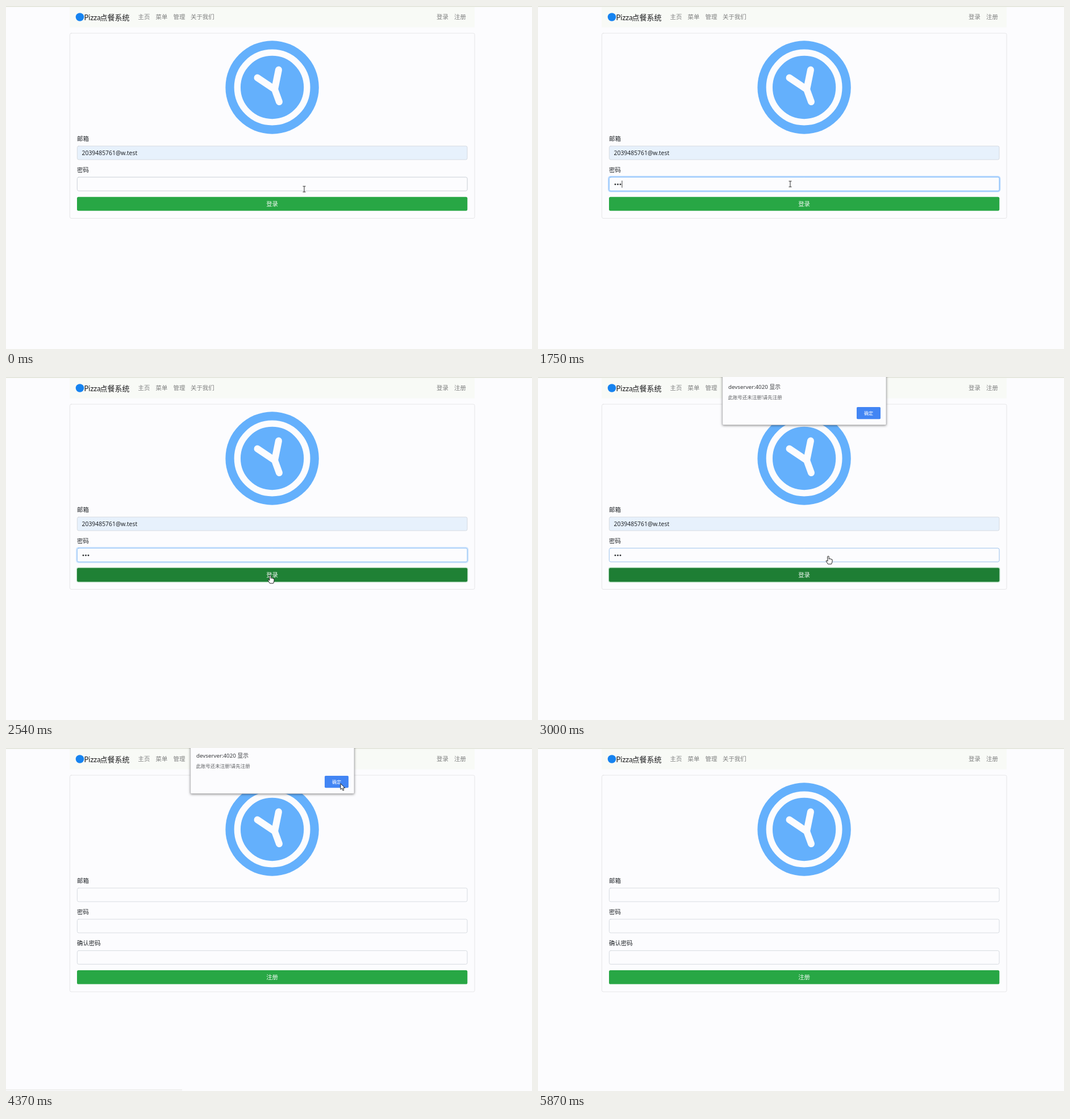
These frames come from a looping animation (926 by 605 pixels, 6580 ms). An HTML page with a canvas:

```html
<!DOCTYPE html>
<html lang="zh-CN">
<head>
<meta charset="utf-8">
<title>登录</title>
<style>
html, body { margin: 0; width: 100%; height: 100%; overflow: hidden; background: #fcfcfe; }
canvas { display: block; width: 926px; height: 605px; }
</style>
</head>
<body>
<canvas id="stage" width="926" height="605"></canvas>
<script>
const ctx = document.getElementById('stage').getContext('2d');
const LOOP = 6580;
const PAPER = '#fcfcfe', INK = '#212529', BLUE = '#64b0fc';
const SANS = '"Noto Sans", "Noto Sans CJK SC", sans-serif';

// Moments of the story, in ms
const FOCUS = 900, HOVER = 2020, PRESS = 2430, OPEN = 2540;
const DIALOG_HOVER = 3540, CLOSE = 4330, LINE_END = 4900, LEAVE = 5860;
const KEYS = [1390, 1550, 1710];

// Pointer hotspot: time, x, y
const PATH = [
  [0, 525, 323], [40, 525, 323], [660, 462, 316], [1000, 444, 314],
  [1800, 444, 314], [2020, 465, 347], [2370, 465, 350], [2700, 465, 350],
  [2840, 480, 376], [3000, 511, 316], [3350, 518, 106], [3620, 587, 62],
  [3790, 589, 63], [4450, 589, 63], [4660, 592, 88], [5000, 593, 94],
  [5400, 559, 84], [LEAVE, 344, -14]
];

const clamp = v => Math.max(0, Math.min(1, v));
const progress = (t, start, length) => clamp((t - start) / length);
const ease = v => v * v * (3 - 2 * v);
const mix = (a, b, p) =>
  `rgb(${a.map((v, i) => Math.round(v + (b[i] - v) * p)).join()})`;

function text(s, x, middle, size, color = INK, align = 'left', family = SANS) {
  ctx.font = `${size}px ${family}`;
  ctx.fillStyle = color;
  ctx.textAlign = align;
  ctx.fillText(s, x, middle + size * 0.37);
}

function box(x, y, w, h, r, fill, stroke, width = 0.8) {
  ctx.beginPath();
  ctx.roundRect(x, y, w, h, r);
  if (fill) { ctx.fillStyle = fill; ctx.fill(); }
  if (stroke) { ctx.strokeStyle = stroke; ctx.lineWidth = width; ctx.stroke(); }
}

function disc(x, y, r, color) {
  ctx.fillStyle = color;
  ctx.beginPath();
  ctx.arc(x, y, r, 0, 7);
  ctx.fill();
}

function polyline(points, color, width) {
  ctx.strokeStyle = color;
  ctx.lineWidth = width;
  ctx.lineCap = ctx.lineJoin = 'round';
  ctx.beginPath();
  points.forEach(([x, y]) => ctx.lineTo(x, y));
  ctx.stroke();
}

function header() {
  ctx.fillStyle = '#dfe1d5';
  ctx.fillRect(0, 0, 926, 1.5);
  ctx.fillStyle = '#f8faf6';
  ctx.fillRect(112, 2, 713, 35.5);
  disc(130, 19.5, 7.3, '#1683f0');
  text('Pizza', 137.5, 20, 13, '#1c1c1e', 'left', 'Lato, sans-serif');
  text('点餐系统', 165.5, 20, 13, '#1c1c1e');
  const links = [['主页', 232.5], ['菜单', 263.5], ['管理', 294.5],
    ['关于我们', 325], ['登录', 758], ['注册', 789]];
  links.forEach(([label, x]) => text(label, x, 19.5, 10.4, '#7e7f7f'));
}

function clock() {
  disc(468.6, 143.5, 82.2, BLUE);
  ctx.strokeStyle = PAPER;
  ctx.lineWidth = 11.3;
  ctx.beginPath();
  ctx.arc(468.6, 143.5, 61.3, 0, 7);
  ctx.stroke();
  polyline([[442.5, 126.5], [473, 147], [481, 169]], PAPER, 12);
  polyline([[480, 112.5], [473, 147]], PAPER, 12);
}

function field(label, y, fill = PAPER, border = '#ced4da') {
  text(label, 125, y - 13, 10.4);
  box(125.4, y, 686.6, 24, 2.6, fill, border);
}

function button(label, y, color) {
  box(125, y, 687.3, 24.5, 2.6, color);
  text(label, 468.6, y + 12.5, 10.4, '#f4fbf5', 'center');
}

function passwordState(t) {
  const lost = progress(t, PRESS, 300);
  const glow = progress(t, FOCUS, 150) * (1 - lost);
  if (glow > 0) box(124.3, 300.9, 688.8, 26.2, 3.6, null, `rgba(0,123,255,${0.28 * glow})`, 2.4);
  const on = progress(t, FOCUS, 150) - 0.35 * lost;
  box(125.4, 302, 686.6, 24, 2.6, PAPER, mix([206, 212, 218], [128, 189, 255], on), 0.9);

  const typed = KEYS.filter(k => t >= k).length;
  for (let i = 0; i < typed; i++) disc(136 + i * 4.5, 314.6, 1.45, '#2b2d30');
  const since = t - Math.max(FOCUS, ...KEYS.filter(k => t >= k));
  if (t >= FOCUS && t < PRESS && since % 1000 < 500) {
    ctx.fillStyle = '#333';
    ctx.fillRect(134 + typed * 4.5, 308, 0.9, 12.5);
  }
}

function loginPage(t) {
  box(112.4, 48, 712.7, 326.5, 2.6, null, '#e0e0e2');
  clock();
  field('邮箱', 247, '#e7f1fc');
  text('2039485761@w.test', 133.5, 259, 10.4);
  field('密码', 302);
  passwordState(t);
  const pressed = progress(t, PRESS, 150);
  if (pressed) box(124.4, 336.1, 688.5, 25.7, 3, null, `rgba(40,167,69,${0.3 * pressed})`, 1.4);
  const color = pressed
    ? mix([33, 136, 56], [30, 126, 52], pressed)
    : mix([40, 167, 69], [33, 136, 56], progress(t, HOVER, 150));
  button('登录', 336.7, color);
}

function registerPage() {
  box(112.4, 48, 712.7, 382, 2.6, null, '#e0e0e2');
  clock();
  field('邮箱', 247);
  field('密码', 302);
  field('确认密码', 357.4);
  button('注册', 392, '#28a745');
}

function dialog(t) {
  const shown = ease(progress(t, OPEN, 110));
  const gone = progress(t, CLOSE, 160);
  if (shown === 0 || gone === 1) return;
  ctx.save();
  ctx.globalAlpha = shown * (1 - clamp(gone * 1.6 - 0.6));
  ctx.translate(0, -16 * (1 - shown) - 16 * gone);
  ctx.save();
  ctx.shadowColor = 'rgba(0,0,0,.5)';
  ctx.shadowBlur = 4;
  ctx.shadowOffsetY = 1;
  box(324.7, -10, 288.3, 94.5, 1.5, PAPER);
  ctx.restore();
  box(324.7, -10, 288.3, 94.5, 1.5, null, '#b5b5b8', 0.7);
  text('devserver:4020 显示', 335, 17, 9.75, '#37393c');
  text('此账号还未注册!请先注册', 334.5, 36, 8.45, '#5c5e61');
  const hovered = t >= DIALOG_HOVER && t < CLOSE;
  box(561, 53, 42, 21.3, 1.8, hovered ? '#4080e5' : '#4285f4');
  text('确定', 582, 64, 8, '#fff', 'center');
  ctx.restore();
}

function pointerAt(t) {
  const i = PATH.findIndex(p => p[0] > t);
  const [t0, x0, y0] = PATH[i - 1], [t1, x1, y1] = PATH[i];
  const p = ease((t - t0) / (t1 - t0));
  return [x0 + (x1 - x0) * p, y0 + (y1 - y0) * p];
}

function beam() {
  ctx.fillStyle = '#333';
  ctx.fillRect(-0.5, -5, 1, 10);
  ctx.fillRect(-2.5, -5.5, 5, 1);
  ctx.fillRect(-2.5, 4.5, 5, 1);
}

function shape(d) {
  const path = new Path2D(d);
  ctx.fillStyle = '#fff';
  ctx.fill(path);
  ctx.strokeStyle = '#222';
  ctx.lineWidth = 1;
  ctx.lineJoin = 'round';
  ctx.stroke(path);
}

const hand = () => shape('M-1.2 0.5Q0-.8 1.2.5V5L3 4.6 4.8 5.2 7 6V10L5.5 14H-.5L-4 8.5Q-3.5 6.8-1.2 8.5Z');
const arrow = () => shape('M0 0V10.2L2.4 8 4.1 12 5.9 11.2 4.2 7.4H7.4Z');

function pointer(t) {
  if (t >= LEAVE) return;
  const [x, y] = pointerAt(t);
  ctx.save();
  ctx.translate(x, y);
  if (t < 1900) beam();
  else if (t < 3450) hand();
  else arrow();
  ctx.restore();
}

function draw(t) {
  ctx.fillStyle = PAPER;
  ctx.fillRect(0, 0, 926, 605);
  header();
  if (t < CLOSE) loginPage(t);
  else registerPage();
  if (t >= CLOSE && t < LINE_END) {
    ctx.fillStyle = '#e4e4df';
    ctx.fillRect(0, 602.5, 310, 1);
  }
  dialog(t);
  pointer(t);
}

const start = performance.now();
function tick() {
  draw((performance.now() - start) % LOOP);
  requestAnimationFrame(tick);
}
tick();
</script>
</body>
</html>
```
